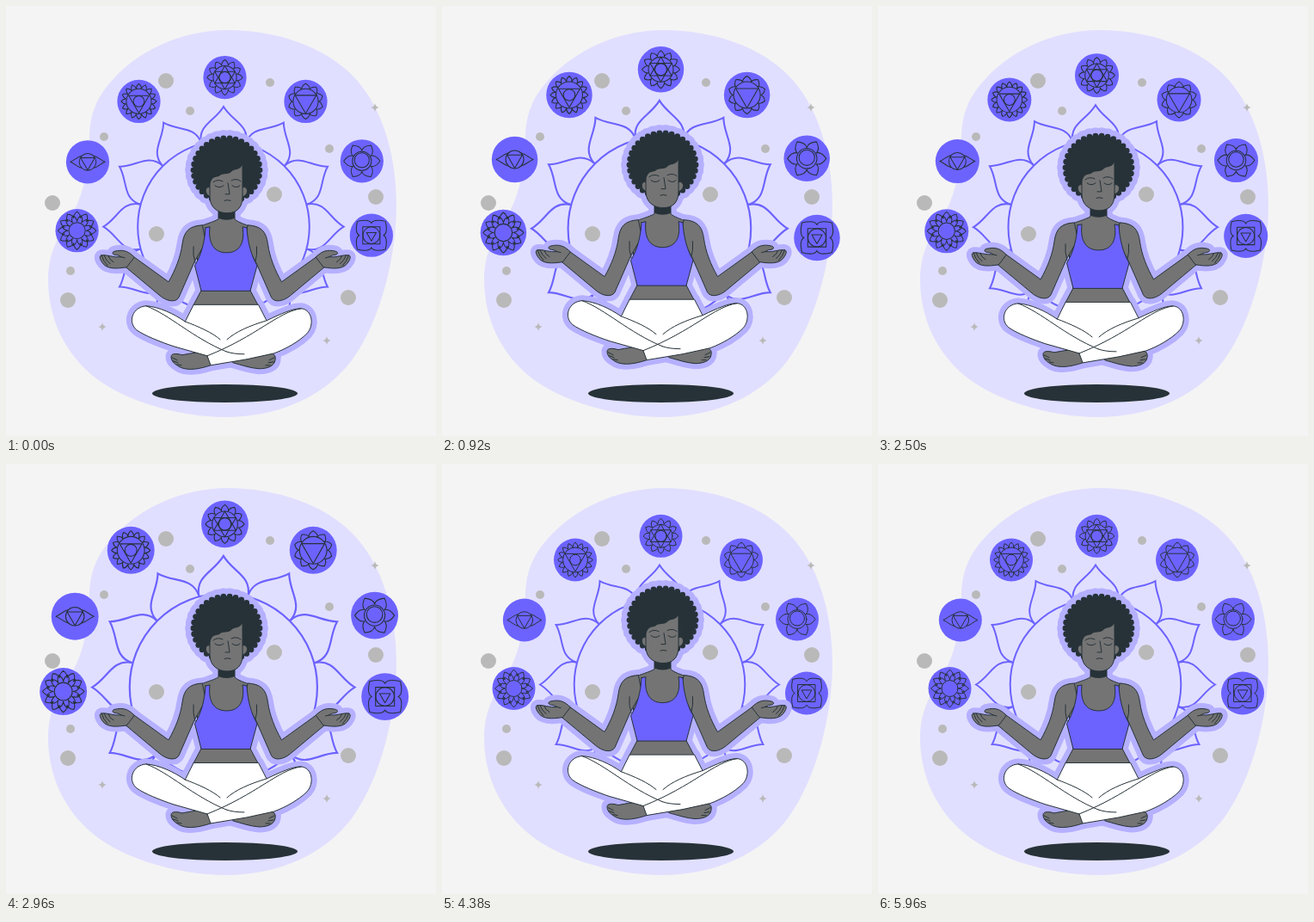
An HTML page that plays this animation: 500 by 500 pixels, repeating every 6 s.

```html
<!DOCTYPE html>
<html lang="en">
<head>
<meta charset="utf-8">
<title>Meditation</title>
<style>
html, body { margin: 0; width: 100%; height: 100%; overflow: hidden; background: #f4f4f4; }
svg { display: block; width: 100vw; height: 100vh; }
.ink { stroke: #263238; stroke-width: 1; stroke-linejoin: round; stroke-linecap: round; }
.line { fill: none; }
.skin { fill: #747474; }
.dark { fill: #263238; stroke: none; }
.top { fill: #6c63ff; }
.pants { fill: #fff; }
#halo * { fill: #b5b0ff; stroke: #b5b0ff; stroke-width: 13; stroke-linejoin: round; }
#halo .line { display: none; }
</style>
</head>
<body>
<svg viewBox="0 0 500 500">
  <path fill="#e1dfff" d="M258 28C200 28 150 55 122 88C104 108 98 128 97 150C96 185 92 215 78 240C63 264 49 285 49 318C49 355 62 392 92 422C128 458 200 478 255 478C320 478 372 452 402 412C436 366 454 290 454 232C454 170 436 115 404 82C372 48 315 28 258 28Z"/>
  <g id="specks" fill="#b9b9b9"></g>
  <ellipse cx="254.5" cy="450.5" rx="84.5" ry="10.5" fill="#263238"/>
  <g id="aura"></g>
  <g id="figure"><g id="halo"></g><g id="body" class="ink"></g></g>
</svg>
<script>
const $ = id => document.getElementById(id);
const range = n => [...Array(n).keys()];
const circle = (x, y, r) => `<circle cx="${x}" cy="${y}" r="${r}"/>`;
const path = (d, cls = '') => `<path class="${cls}" d="${d}"/>`;

// Polar point around the origin, angle in turns clockwise from the top
const polar = (turn, r) => {
  const a = turn * 2 * Math.PI;
  return `${(r * Math.sin(a)).toFixed(2)} ${(-r * Math.cos(a)).toFixed(2)}`;
};

// Ring of pointed petals from radius a to tip radius b
const petals = (n, a, b, shift = 0) => path(range(n).map(k => {
  const c = (k + shift) / n, h = 0.5 / n, m = a + (b - a) * 0.62;
  return `M${polar(c - h, a)}Q${polar(c - h * 0.85, m)} ${polar(c, b)}Q${polar(c + h * 0.85, m)} ${polar(c + h, a)}`;
}).join(''));

// Regular polygon; shift 0.5 points a triangle downwards
const polygon = (n, r, shift = 0) =>
  path('M' + range(n).map(k => polar((k + shift) / n, r)).join('L') + 'Z');

const specks = [
  [186, 87, 9], [307, 89, 5], [214, 122, 5], [114, 152, 5], [376, 166, 5], [54, 229, 9],
  [430, 222, 9], [312, 219, 9], [175, 265, 9], [75, 308, 5], [72, 342, 9], [398, 339, 9]
];
const sparkles = [[429, 118], [112, 373], [373, 389]];
$('specks').innerHTML = specks.map(s => circle(...s)).join('') +
  sparkles.map(([x, y]) => path(`M${x} ${y - 5}q.7 4.3 5 5q-4.3 .7-5 5q-.7-4.3-5-5q4.3-.7 5-5Z`)).join('');

const chakras = [
  [83.5, 261, petals(12, 15, 22) + petals(12, 10.5, 18, 0.5) + circle(0, 0, 9.5)],
  [95.8, 181.5, circle(0, 0, 9.8) + polygon(3, 9.5, 0.5) +
    path('M-7 -7C-12 -6 -15 -2 -20 0C-15 2 -12 6 -7 7M7 -7C12 -6 15 -2 20 0C15 2 12 6 7 7')],
  [155, 111.5, petals(16, 15, 20.5) + circle(0, 0, 14.5) + polygon(3, 13.5, 0.5) + circle(0, 0, 6.3)],
  [254.5, 83.8, petals(12, 14.5, 20.5) + circle(0, 0, 13.5) + polygon(3, 13.5) +
    polygon(3, 13.5, 0.5) + circle(0, 0, 6.5)],
  [348, 111.5, petals(10, 15, 20.5) + circle(0, 0, 14.5) + polygon(3, 14, 0.5)],
  [413, 180.5, petals(6, 12, 21, 0.5) + circle(0, 0, 11) + circle(0, -1, 8.5)],
  [424, 266.5, petals(4, 14, 23, 0.5) + path('M-10 -10H10V10H-10Z') + circle(0, 0, 9.8) + polygon(3, 6.5, 0.5)]
];
const lotus = range(12).map(k => `<g transform="rotate(${k * 30})">` +
  path('M-26 -96.6C-30 -118 -10 -122 0 -139C10 -122 30 -118 26 -96.6') + '</g>').join('');
$('aura').innerHTML =
  `<g transform="translate(253 256.5)" fill="none" stroke="#6c63ff" stroke-width="2">${circle(0, 0, 99.3)}${lotus}</g>` +
  chakras.map(([x, y, art]) => `<g transform="translate(${x} ${y})">` +
    `<circle r="25" fill="#6c63ff"/><g class="ink line">${art}</g></g>`).join('');

const arm =
  path('M228 255C213 256 207 262 205 277C203 292 197 307 189 321L146 290L137 302L179 337C186 343 197 346 201 339L219 298L232 275Z', 'skin') +
  path('M149 292C142 285 136 283 126 285.500C122 287 124 290 130 290L134 292C125 293 117 289 111 290C108 291 109 295 113 300C118 306 128 306 140 304Z', 'skin') +
  path('M111 290Q113 297 118 302M114 290Q116 296 121 300M119 291Q120 295 125 298M134 292L138 293M218 280Q217 290 220 299', 'line');
const hair = range(34).map(k => {
  const a = k / 17 * Math.PI;
  return circle((256.5 + 38.5 * Math.cos(a)).toFixed(1), (191 + 37 * Math.sin(a)).toFixed(1), 3.4);
}).join('');

const figure =
  path('M236 403C226 402 215 404 205 406C198 404 192 404 192 408C192 414 197 417 202 420C212 425 226 422 238 418Z', 'skin') +
  path('M272 406C285 403 296 406 304 405C312 403 314 407 313 412C312 419 304 422 294 422C283 421 275 418 264 415Z', 'skin') +
  path('M193 409l6 3M194 413l6 2M199 417l5 1M312 409l-6 3M311 414l-6 1M307 418l-5 0', 'line') +
  path('M247 232V248C240 252 230 254 225 257L221 282L227 331L218 348H293L284 331L290 282L285 257C278 254 270 252 266 248V232Z', 'skin') +
  path('M218.500 347.500H293.500L303 366C320 358 333 352 343 352C356 353 359 371 350 381C340 391 325 399 312 404L280 411L238 418L234 407L195 396C180 391 160 383 152 377C141 368 147 350 163 349C178 350 195 358 208 367Z', 'pants') +
  path('M208 367C224 373 240 380 249 388M303 366C283 372 267 379 257 388M163 349C190 359 217 386 256 402M343 352C316 356 292 384 234 407M256 402Q264 405 277 405', 'line') +
  arm + `<g transform="matrix(-1 0 0 1 509.500 0)">${arm}</g>` +
  path('M232 258L237 257C235 275 241 287 256.500 287C272 287 278 275 275 257L280 258C281 275 285 290 292 302L284 331.500H227L219.500 302C227 290 231 275 232 258Z', 'top') +
  `<g class="dark">${hair}<ellipse cx="256.5" cy="191" rx="39" ry="37.500"/></g>` +
  path('M247 238H266V247Q256.500 251 247 247Z', 'dark') +
  path('M237 211C231 209 230 220 238 222ZM275 211C282 209 283 220 275 222Z', 'skin') +
  path('M237 195V222C237 235 247 241 257 241C268 241 275 235 275 222V182Z', 'skin') +
  path('M234 180L278 175L277 198C277 192 276 188 275 185C271 192 266 189 262 193C258 197 252 194 248 198C244 200 240 197 237 208Z', 'dark') +
  path('M241 205Q246 201 252 204M262 203Q268 200 273 204M243 209Q248 213 253 209M263 209Q268 213 272 209M258 206L260 219H255M254 226.500Q257 225 261 226.500', 'line');
$('halo').innerHTML = $('body').innerHTML = figure;

// Keyframes of the pulse: [ms, scale]
const beat = [[0, 1], [600, 1.1], [1800, 1], [2400, 1], [3000, 1.1], [3600, 1], [6000, 1]];
const pulse = t => {
  const i = beat.findIndex(([end]) => t < end);
  const [t0, s0] = beat[i - 1], [t1, s1] = beat[i];
  return s0 + (s1 - s0) * (t - t0) / (t1 - t0);
};

function draw() {
  const t = (performance.now() + 30) % 6000;
  const lift = 10 * (1 - Math.abs(t % 3000 / 1500 - 1));
  $('figure').setAttribute('transform', `translate(0 ${-lift})`);
  $('aura').setAttribute('transform', `translate(254.5 225) scale(${pulse(t)}) translate(-254.5 -225)`);
  requestAnimationFrame(draw);
}
draw();
</script>
</body>
</html>
```
